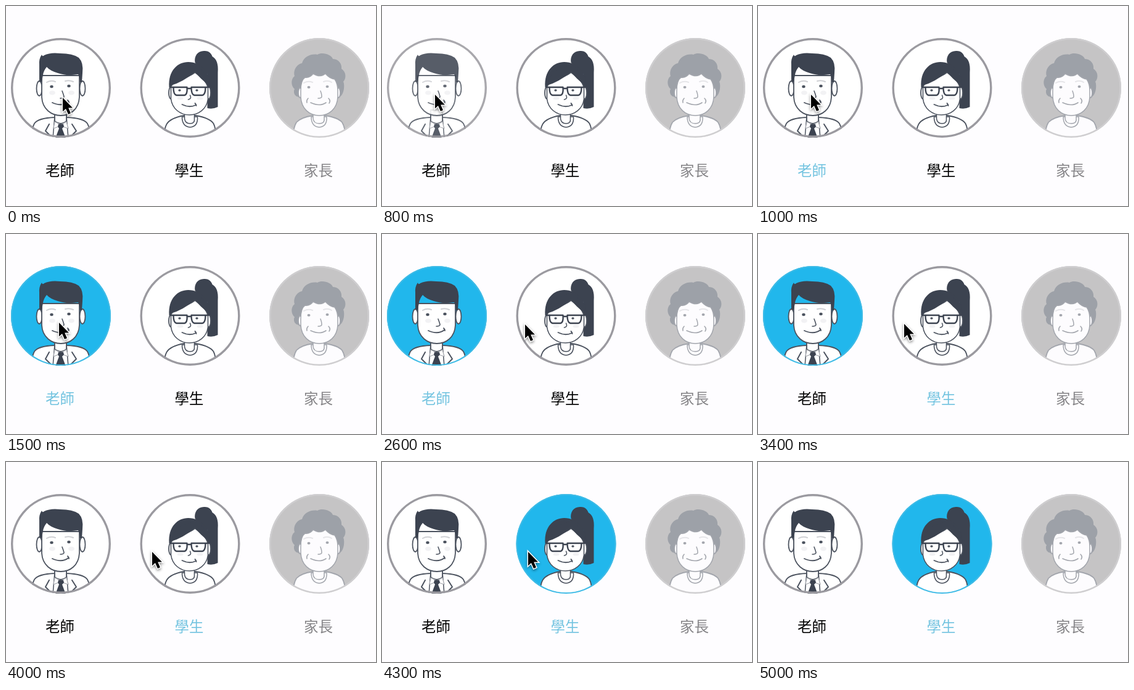
An HTML page with a canvas for the animation above (5.1 s loop, 600 by 325 pixels).

```html
<!DOCTYPE html>
<html lang="zh-Hant">
<head>
<meta charset="utf-8">
<style>
html, body { margin: 0; width: 100%; height: 100%; overflow: hidden; background: #fefdff; }
canvas { display: block; width: 600px; height: 325px; }
</style>
</head>
<body>
<canvas id="stage"></canvas>
<script>
const canvas = document.getElementById('stage');
const ctx = canvas.getContext('2d');
const ratio = window.devicePixelRatio || 1;
canvas.width = 600 * ratio;
canvas.height = 325 * ratio;

const LOOP = 5100;
const INK = '#3c4350', LINE = '#4c535f', SOFT = '#e6e6e9', BLUE = '#21b7ec', RING = '#9b9aa0';

function shape(d, fill, stroke, width = 1.8) {
  const path = new Path2D(d);
  if (fill) { ctx.fillStyle = fill; ctx.fill(path); }
  if (stroke) { ctx.strokeStyle = stroke; ctx.lineWidth = width; ctx.stroke(path); }
}

function dot(x, y, rx, ry, fill, stroke) {
  ctx.beginPath();
  ctx.ellipse(x, y, rx, ry, 0, 0, Math.PI * 2);
  if (fill) { ctx.fillStyle = fill; ctx.fill(); }
  if (stroke) { ctx.strokeStyle = stroke; ctx.lineWidth = 1.8; ctx.stroke(); }
}

// Avatars are drawn around the centre of their disc.
function teacher() {
  shape('M-10 43V48Q-37 49-43 58Q-47 65-48 82H48Q47 65 43 58Q37 49 9 48V43Z', '#fff', LINE);
  shape('M-10 46L-13 82H12L9 46Z', '#fff', LINE, 1.5);
  dot(-35, 1, 4.5, 12, '#fff', LINE);
  dot(35, 1, 4.5, 12, '#fff', LINE);
  shape('M-10 36V54Q0 62 9 54V36Z', '#fff', LINE);
  shape('M-31-20V15C-30 35-15 45 0 45C15 45 29 35 30 15V-20Z', '#fff', LINE);
  shape('M-35-10V-37Q-36-47-31-54Q-30-50-27-53Q-17-58-1-56Q19-56 29-49Q37-41 35-24L34-9H31Q31-17 28-22Q9-19-5-24Q-18-28-23-34Q-28-28-29-21L-31-10Z', INK);
  dot(-15, -2, 2.7, 2.2, LINE);
  dot(13, -3, 2.7, 2.2, LINE);
  shape('M-23-9Q-16-13-9-10M7-11Q14-13 20-10', null, '#cfd0d4', 2);
  dot(-14, 8, 5, 3.5, '#f2f2f4');
  dot(17, 8, 5, 3.5, '#f2f2f4');
  shape('M2 5Q4 10 5 14Q5 17-1 17', null, LINE, 1.6);
  shape('M-14 24Q2 31 12 23M11 20Q13 22 13 24', null, LINE);
  shape('M-10 55L0 60L9 55L12 66L3 63L0 60L-4 63L-12 66Z', '#fff', '#a3a6ac', 1.2);
  shape('M-4 59H4L5 63L2 66L8 82H-9L-3 66L-5 63Z', INK);
  shape('M-19 59L-25 70L-17 78M18 59L25 70L17 78', null, LINE, 2);
}

function student() {
  shape('M8-41C6-52 13-61 24-60C31-60 35-55 36-51C43-47 46-39 45-25V31Q37 35 28 33V-22Q18-30 8-41Z', INK);
  shape('M-10 45Q-32 49-38 59Q-42 66-42 82H42Q42 66 38 58Q32 49 9 45Z', '#fff', LINE);
  dot(-31, 8, 3.5, 10, '#fff', LINE);
  dot(30, 8, 3.5, 10, '#fff', LINE);
  shape('M-34-1C-36-28-20-42-3-42C18-42 33-25 33 0Z', INK);
  shape('M-13 47Q-13 63 0 64Q13 63 12 47Z', '#fff', LINE, 1.6);
  shape('M-9 40V50Q-8 58 0 58Q8 58 7 50V40Z', '#fff', LINE, 1.6);
  shape('M-31-2Q-26-10-17-14Q-1-18 8-25Q14-21 20-15Q27-8 29 0V18C27 35 13 44-1 44C-16 44-29 34-31 18Z', '#fff', LINE, 1.6);
  shape('M-31-4Q-12-9 8-26Q16-15 30-5L31-18L9-38L-22-26Z', INK);
  shape('M-28-1H-5Q-4 11-9 12H-22Q-27 11-27 0M2-1H25Q25 11 20 12H7Q2 11 2 0M-5 1H2M-32-1H-27M25-1H30', null, INK, 2.4);
  dot(-17, 4, 2.2, 1.8, LINE);
  dot(11, 4, 2.2, 1.8, LINE);
  shape('M0 12Q3 18-3 19', null, LINE, 1.6);
  shape('M-13 27Q-1 33 9 28M8 25Q10 27 10 29', null, LINE);
  dot(-16, 17, 5, 2.5, '#f2f2f4');
  dot(16, 17, 5, 2.5, '#f2f2f4');
}

function parent() {
  const hair = '#9da1a8', line = '#a3a6ad', white = '#fdfcfe';
  shape('M-31 15C-42 15-42 5-40 2C-48-6-44-17-40-19C-43-30-35-39-28-40C-25-52-11-56-3-54C5-59 20-54 22-47C32-47 37-38 36-31C44-26 44-15 39-10C42-4 40 16 29 16Z', hair);
  shape('M-10 45Q-30 48-37 56Q-42 64-43 82H43Q42 64 37 56Q30 48 9 45Z', white, line);
  shape('M-13 47Q-13 63 0 64Q13 63 12 47Z', white, line, 1.5);
  shape('M-10 38V50Q-9 58 0 58Q9 58 8 50V38Z', white, line, 1.5);
  dot(-31, 8, 3, 8, white, line);
  dot(31, 8, 3, 8, white, line);
  shape('M-30 4Q-30-12-23-17Q-15-16-10-23Q2-16 10-23Q17-15 25-14Q30-7 30 5V15C29 34 16 45 0 45C-16 45-29 34-30 15Z', white, line, 1.5);
  dot(-17, -1, 2.5, 2.1, line);
  dot(13, -2, 2.5, 2.1, line);
  shape('M-25-8Q-18-12-11-9M7-10Q14-13 20-9', null, SOFT, 2);
  shape('M2 5Q4 10 4 14Q4 17-2 17', null, line, 1.5);
  shape('M-14 24Q1 31 11 24M-18 17Q-21 20-20 24M15 17Q19 21 16 25', null, line, 1.6);
}

function avatar(x, draw, { disc, ring, ringWidth, alpha = 1 }) {
  ctx.save();
  ctx.translate(x, 133);
  ctx.globalAlpha = alpha;
  ctx.save();
  ctx.beginPath();
  ctx.arc(0, 0, 81, 0, Math.PI * 2);
  ctx.clip();
  ctx.fillStyle = disc;
  ctx.fillRect(-82, -82, 164, 164);
  draw();
  ctx.restore();
  ctx.beginPath();
  ctx.arc(0, 0, 81 - ringWidth / 2, 0, Math.PI * 2);
  ctx.strokeStyle = ring;
  ctx.lineWidth = ringWidth;
  ctx.stroke();
  ctx.restore();
}

const plain = { disc: '#fff', ring: RING, ringWidth: 3.4 };
const chosen = { disc: BLUE, ring: '#3fbbe6', ringWidth: 2 };
const disabled = { disc: '#c5c4c5', ring: '#cfced0', ringWidth: 2.5 };

function label(text, x, color) {
  ctx.font = '400 23.4px "Noto Sans CJK TC", "Noto Sans CJK", "Noto Sans CJK JP", sans-serif';
  ctx.textAlign = 'center';
  ctx.fillStyle = color;
  ctx.fillText(text, x, 276.4);
}

// Pointer stops: [time, x, y]; each is held until the next.
const stops = [
  [0, 92, 149], [100, 89, 147], [200, 86, 144],
  [2400, 128, 155], [2500, 204, 154], [2600, 232, 147],
  [2700, 234, 147], [2800, 236, 146], [2900, 237, 146],
  [4600, 264, 160], [4700, 331, 177]
];

function pointer(t) {
  if (t >= 4800) return;
  const [, x, y] = stops.filter(s => s[0] <= t).pop();
  ctx.save();
  ctx.translate(x, y);
  ctx.lineJoin = 'miter';
  const arrow = 'M0 0V22.5L5 18L9 27L13 25.2L9.2 16.5H16Z';
  ctx.shadowColor = 'rgba(0,0,0,.35)';
  ctx.shadowBlur = 4 * ratio;
  ctx.shadowOffsetY = 2 * ratio;
  shape(arrow, '#fff', '#fff', 3);
  ctx.shadowColor = 'transparent';
  shape(arrow, '#000');
  ctx.restore();
}

function render(now) {
  const t = now % LOOP;
  const between = (from, to) => t >= from && t < to;
  ctx.setTransform(ratio, 0, 0, ratio, 0, 0);
  ctx.lineCap = ctx.lineJoin = 'round';
  ctx.fillStyle = '#fefdff';
  ctx.fillRect(0, 0, 600, 325);

  avatar(89, teacher, { ...(between(1500, 3500) ? chosen : plain), alpha: between(800, 1000) ? 0.86 : 1 });
  avatar(298.5, student, { ...(t >= 4200 ? chosen : plain), alpha: between(3000, 3200) ? 0.86 : 1 });
  avatar(508, parent, disabled);

  label('老師', 87.5, between(1000, 3200) ? '#74c4e0' : '#000');
  label('學生', 297, t >= 3200 ? '#74c4e0' : '#000');
  label('家長', 506.5, '#858487');
  pointer(t);
}

const start = performance.now();
function tick() {
  render(performance.now() - start);
  requestAnimationFrame(tick);
}
tick();
</script>
</body>
</html>
```
